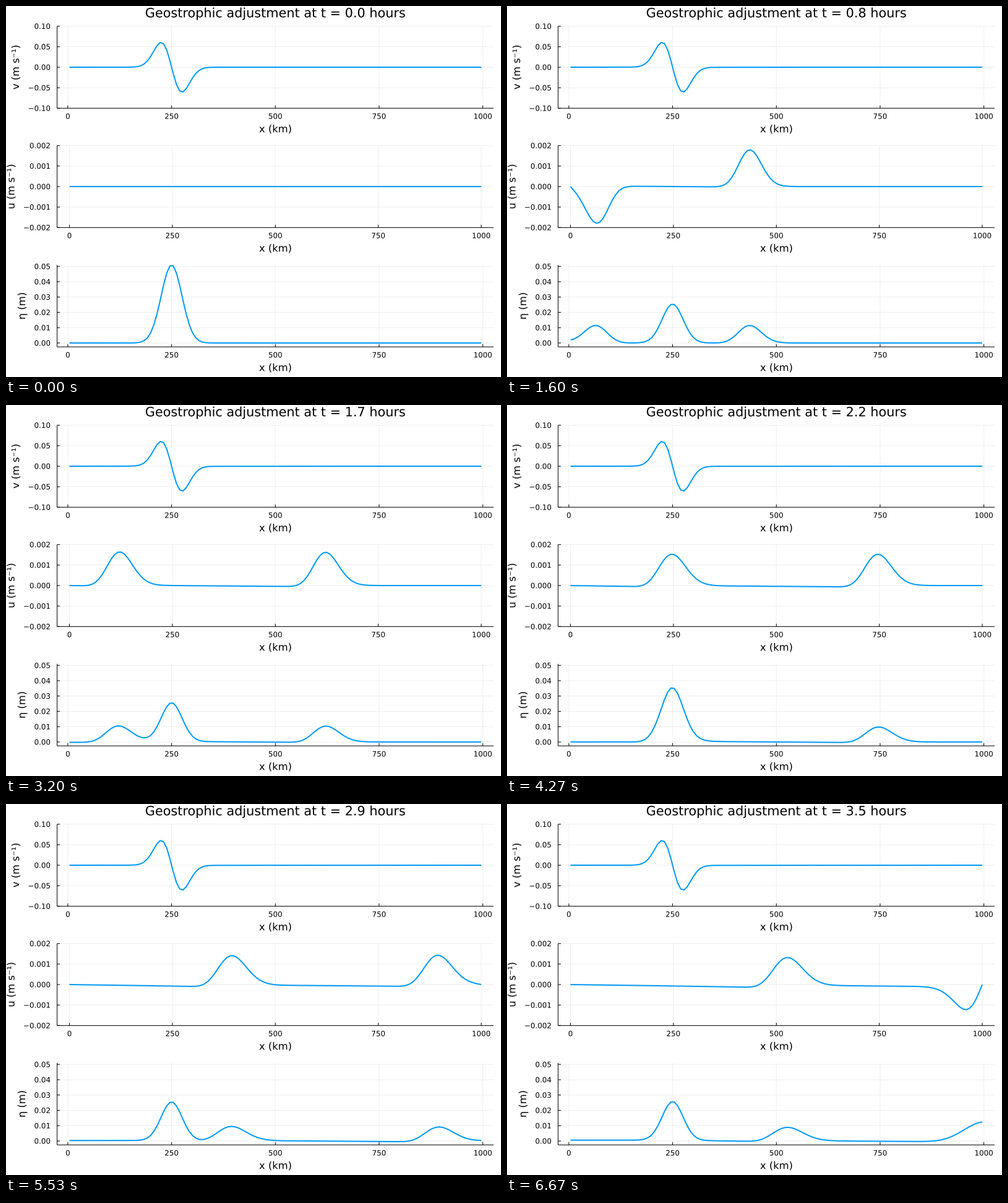
A matplotlib script that plays this animation: 800 by 600 pixels, repeating every 6.74 s.

```python
import numpy as np
import matplotlib.pyplot as plt
from matplotlib.animation import FuncAnimation
from matplotlib.patches import PathPatch
from matplotlib.textpath import TextPath
from matplotlib.transforms import Affine2D

W, H, DPI = 800, 600, 100
PT = 72 / DPI  # points per pixel
TICK_MS, LOOP_MS = 20, 6740
FPS, STATES, STEPS = 15, 101, 10
BLUE = (0.0, 0.6056, 0.9787)

# Shallow-water channel, SI units
N, LENGTH, DEPTH = 128, 1.0e6, 400.0
G, F = 9.80665, 1e-4
DX = LENGTH / N
DT = 0.1 * DX / np.sqrt(G * DEPTH)
SPEED, WIDTH, X0 = 0.1, LENGTH / 40, LENGTH / 4
ETA0 = F * SPEED * WIDTH / G

x_face = np.linspace(0, LENGTH, N + 1)
x_mid = (x_face[1:] + x_face[:-1]) / 2


def mean(a):
    return (a[1:] + a[:-1]) / 2


def tendencies(u, v):
    gu, spin = np.zeros(N + 1), np.zeros(N + 1)
    gu[1:-1] = F * mean(v)
    spin[1:-1] = F + np.diff(v) / DX
    return gu, -mean(spin * u)


def simulate():
    """Adams-Bashforth rotation with an implicit free surface."""
    r = (x_mid - X0) / WIDTH
    bump = np.exp(-r**2 / 2)
    u, v, eta = np.zeros(N + 1), -SPEED * r * bump, 2 * ETA0 * bump

    grad = np.zeros((N + 1, N))
    i = np.arange(1, N)
    grad[i, i], grad[i, i - 1] = 1 / DX, -1 / DX
    div = np.diff(np.eye(N + 1), axis=0) / DX
    solve = np.linalg.inv(np.eye(N) - G * DEPTH * DT**2 * div @ grad)

    states = [(v, u, eta)]
    old = None
    for step in range(1, STEPS * (STATES - 1) + 1):
        new = tendencies(u, v)
        chi = -0.5 if old is None else 0.1
        old = old or new
        du, dv = ((1.5 + chi) * a - (0.5 + chi) * b for a, b in zip(new, old))
        old = new
        u = u + DT * du
        v = v + DT * dv
        eta = solve @ (eta - DT * DEPTH * np.diff(u) / DX)
        u = u - G * DT * (grad @ eta)
        if step % STEPS == 0:
            states.append((v, u, eta))
    return states


states = simulate()

plt.rcParams["font.family"] = "DejaVu Sans"
fig = plt.figure(figsize=(W / DPI, H / DPI), dpi=DPI, facecolor="white")
stage = fig.add_axes([0, 0, 1, 1])
stage.set(xlim=(0, W), ylim=(H, 0), autoscale_on=False)
stage.axis("off")


def text_path(x, y, text, size, align=0.5, angle=0):
    """Outline of text with its baseline at (x, y) in stage pixels."""
    def end(s):
        return TextPath((0, 0), s, size=size).get_extents().x1

    advance = end(text + "|") - end("|")
    place = (Affine2D().translate(-align * advance, 0).scale(1, -1)
             .rotate_deg(-angle).translate(x, y))
    return place.transform_path(TextPath((0, 0), text, size=size))


def write(*args, **kw):
    return stage.add_patch(PathPatch(text_path(*args, **kw), color="black", lw=0))


def rule(x0, y0, x1, y1, **kw):
    stage.plot([x0, x1], [y0, y1], lw=PT, snap=False, solid_capstyle="butt",
               **{"color": "black", **kw})


def panel(top, x, ylim, ticks, digits, name, name_x, name_y):
    left, right, height = 82.6, 788.0, 132.6
    bottom = top + height
    x = x / 1000
    pad = 0.03 * (x[-1] - x[0])
    x_scale = (right - left) / (x[-1] - x[0] + 2 * pad)
    y_scale = height / (ylim[1] - ylim[0])

    def px(value):
        return left + (value - x[0] + pad) * x_scale

    def py(value):
        return bottom - (value - ylim[0]) * y_scale

    grid = dict(color="black", alpha=0.065)
    for t in (0, 250, 500, 750, 1000):
        rule(px(t), top, px(t), bottom, **grid)
        rule(px(t), bottom, px(t), bottom - 4.5)
        write(px(t), bottom + 17.2, str(t), 11.9)
    for t in ticks:
        rule(left, py(t), right, py(t), **grid)
        rule(left, py(t), left + 4.5, py(t))
        text = f"{t:.{digits}f}".replace("-", "\u2212")
        write(72, py(t) + 4.35, text, 11.9, align=1)
    rule(left, top, left, bottom)
    rule(left, bottom, right, bottom)
    write(435.5, bottom + 39, "x (km)", 16.35)
    write(name_x, name_y, name, 16.35, angle=90)

    line, = stage.plot(px(x), np.full_like(x, py(0)), color=BLUE, lw=2 * PT,
                       solid_joinstyle="miter", solid_capstyle="butt", zorder=3)
    return line, py


panels = [
    panel(32.7, x_mid, (-0.1, 0.1), [-0.1, -0.05, 0, 0.05, 0.1], 2,
          "v (m s⁻¹)", 21.1, 98.9),
    panel(225.7, x_face, (-0.002, 0.002), [-0.002, -0.001, 0, 0.001, 0.002], 3,
          "u (m s⁻¹)", 13.6, 292),
    panel(418.7, x_mid, (-0.1 * ETA0, 2 * ETA0), [0, 0.01, 0.02, 0.03, 0.04, 0.05], 2,
          "η (m)", 31.1, 485),
]


def heading(index):
    hours = index * STEPS * DT / 3600
    return text_path(435.3, 18.3, f"Geostrophic adjustment at t = {hours:.1f} hours", 20.8)


title = stage.add_patch(PathPatch(heading(0), color="black", lw=0))


def draw(tick):
    # States advance at 15 per second, rounded to hundredths of a second.
    index = min(int((tick * TICK_MS + 15) * FPS / 1000), STATES - 1)
    title.set_path(heading(index))
    for (line, py), values in zip(panels, states[index]):
        line.set_ydata(py(values))
    return [title, *(line for line, _ in panels)]


anim = FuncAnimation(fig, draw, frames=LOOP_MS // TICK_MS, interval=TICK_MS,
                     repeat=True, repeat_delay=0, blit=False)
plt.show()
```
